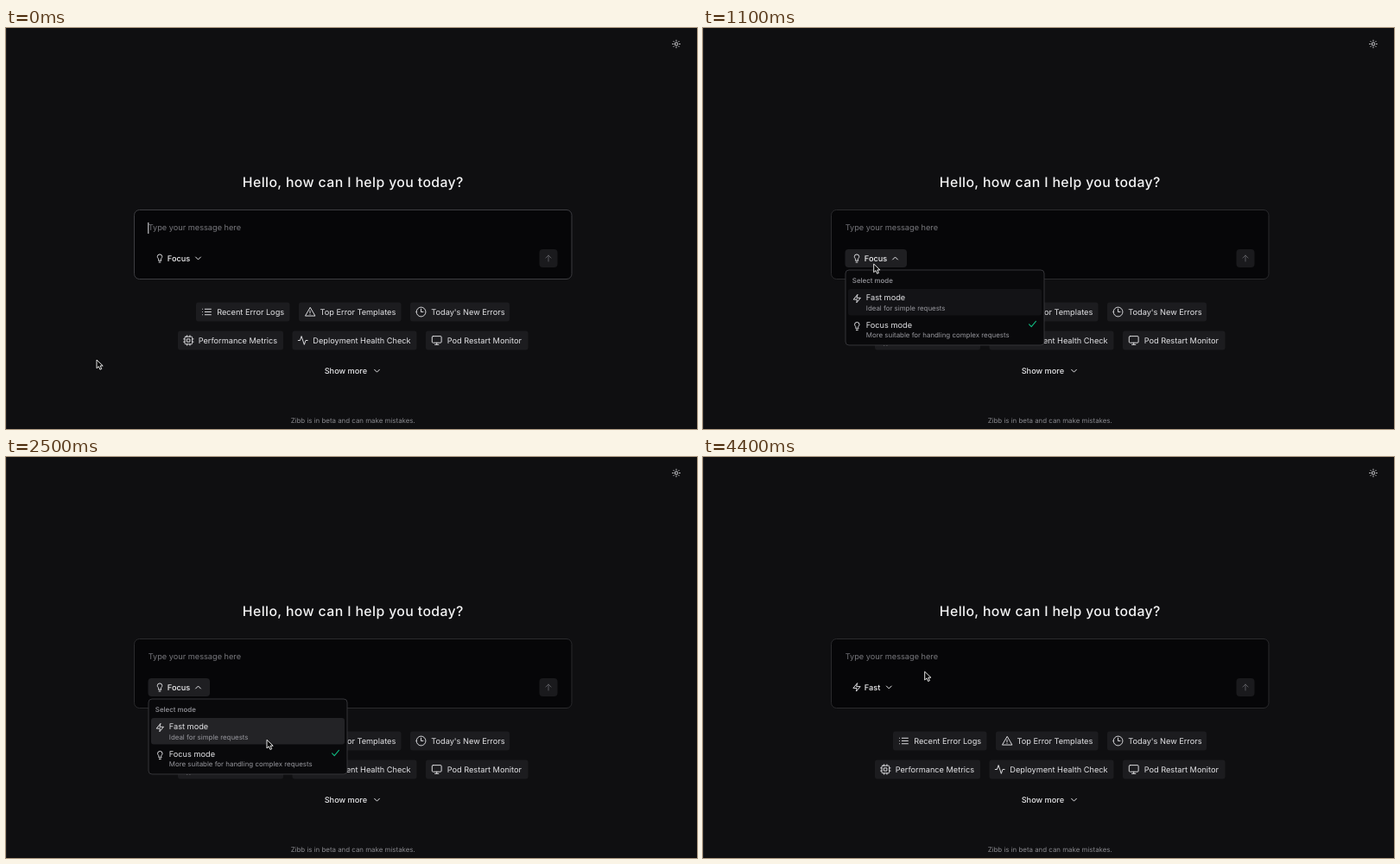
Write an HTML page that moves like this. It is 800 by 464 pixels and loops after 5.5 s.

```html
<!DOCTYPE html>
<html lang="en">
<head>
<meta charset="utf-8">
<title>Assistant mode picker</title>
<style>
  html, body { margin: 0; width: 100%; height: 100%; overflow: hidden; background: #0f0f11; }
  svg { display: block; width: 800px; height: 464px; font-family: Inter, "Open Sans", sans-serif; }
  text { white-space: pre; text-rendering: geometricPrecision; }
  .icon { fill: none; stroke-linecap: round; stroke-linejoin: round; }
</style>
</head>
<body>
<svg id="stage" viewBox="0 0 800 464"></svg>
<script>
const LOOP = 5500, STEP = 100;
const BODY = 9.2, SMALL = 7.9, TITLE = 15.8;

// Icon outlines on a 24 unit grid.
const ICONS = {
  sun: 'M8 12a4 4 0 1 0 8 0a4 4 0 1 0-8 0M12 2v2M12 20v2M4.9 4.9l1.4 1.4M17.7 17.7l1.4 1.4M2 12h2M20 12h2M6.3 17.7l-1.4 1.4M19.1 4.9l-1.4 1.4',
  bulb: 'M15 14c.2-1 .7-1.7 1.5-2.5A5.6 5.6 0 0 0 18 8A6 6 0 0 0 6 8c0 1 .2 2.2 1.5 3.5c.7.7 1.3 1.5 1.5 2.5v4h6zM10 22h4',
  bolt: 'M13 2L3 14h9l-1 8L21 10h-9z',
  list: 'M8 6h13M8 12h13M8 18h13M3 6h.01M3 12h.01M3 18h.01',
  warn: 'M12 3L1.8 20.5h20.4zM12 9.5v5M12 17.5h.01',
  clock: 'M2 12a10 10 0 1 0 20 0a10 10 0 1 0-20 0M12 6v6h4.5',
  chip: 'M6 4h12a2 2 0 0 1 2 2v12a2 2 0 0 1-2 2H6a2 2 0 0 1-2-2V6a2 2 0 0 1 2-2zM9 9h6v6H9zM9 1.5V4M15 1.5V4M9 20v2.5M15 20v2.5M1.5 9H4M1.5 15H4M20 9h2.5M20 15h2.5',
  pulse: 'M22 12h-4l-3 9L9 3l-3 9H2',
  monitor: 'M4 3h16a2 2 0 0 1 2 2v10a2 2 0 0 1-2 2H4a2 2 0 0 1-2-2V5a2 2 0 0 1 2-2zM8 21h8M12 17v4',
  arrowUp: 'M12 20V4M5 11l7-7 7 7',
  check: 'M3 13l6 6L21 5',
  chevron: 'M5 8.5l7 7 7-7'
};

const icon = (name, cx, cy, size, color = '#e4e4e7', width = 0.95) =>
  `<path class="icon" d="${ICONS[name]}" stroke="${color}" stroke-width="${width * 24 / size}"
    transform="translate(${cx} ${cy}) scale(${size / 24}) translate(-12 -12)"/>`;
const text = (s, x, y, size = BODY, color = '#e4e4e7', extra = '') =>
  `<text x="${x}" y="${y}" font-size="${size}" fill="${color}" ${extra}>${s}</text>`;
const rect = (x, y, w, h, r, fill, extra = '') =>
  `<rect x="${x}" y="${y}" width="${w}" height="${h}" rx="${r}" fill="${fill}" ${extra}/>`;
const chip = (x, y, w, name, iconX, label, labelX) =>
  rect(x, y, w, 22, 3, '#1c1c1f') + icon(name, iconX, y + 11, 13) + text(label, labelX, y + 14.3);
const chevron = (id, x, y) =>
  `<g id="${id}" transform="translate(${x} ${y})">${icon('chevron', 0, 0, 10, '#e4e4e7', 1)}</g>`;

const medium = 'font-weight="500"';
const muted = '#97979d';

document.getElementById('stage').innerHTML = `
  ${rect(0, 0, 800, 464, 0, '#0f0f11')}
  ${rect(0, 0, 1, 464, 0, '#1d1d20')}
  ${icon('sun', 776, 18.5, 10.5, '#e4e4e7', 0.9)}
  ${text('Hello, how can I help you today?', 273.8, 184.3, TITLE, '#f4f4f5', medium + ' letter-spacing=".025em"')}

  ${rect(148.5, 210.5, 506.5, 80, 6, '#060608', 'id="composer"')}
  ${text('Type your message here', 164.7, 234, BODY, '#77777c')}
  ${rect(164.3, 225, 1, 13, 0, '#e4e4e7', 'id="caret"')}
  ${rect(164.5, 256, 71.5, 21, 4, '#1f1f22', 'id="modeHover"')}
  <g id="focusLabel">${icon('bulb', 178, 266.5, 11)}${text('Focus', 186.8, 269.8, BODY, '#f0f0f2', medium)}</g>
  <g id="fastLabel">${icon('bolt', 178, 266.5, 11)}${text('Fast', 186.8, 269.8, BODY, '#f0f0f2', medium)}</g>
  ${chevron('modeChevron', 222.5, 266.5)}
  ${rect(617.5, 256, 21, 21, 4, '#1a1a1d')}
  ${icon('arrowUp', 628, 266.5, 10.5, '#5c5c61')}

  ${chip(220, 317.5, 108.5, 'list', 232.5, 'Recent Error Logs', 244.2)}
  ${chip(339, 317.5, 118.5, 'warn', 352, 'Top Error Templates', 363.6)}
  ${chip(468, 317.5, 115, 'clock', 480.5, "Today's New Errors", 492.3)}
  ${chip(199, 350.5, 122, 'chip', 211.3, 'Performance Metrics', 222.7)}
  ${chip(331.5, 350.5, 144, 'pulse', 343.7, 'Deployment Health Check', 355.3)}
  ${chip(486, 350.5, 118.5, 'monitor', 498.7, 'Pod Restart Monitor', 510.7)}
  ${text('Show more', 368.7, 399.8, BODY, '#e4e4e7', medium)}
  ${chevron('moreChevron', 429.5, 396.7)}
  ${text('Zibb is in beta and can make mistakes.', 401.7, 456.8, SMALL, '#88888d', 'text-anchor="middle"')}

  <g id="menu">
    ${rect(165, 280, 230, 87, 4, '#09090b', 'stroke="#343438"')}
    ${text('Select mode', 172.8, 294.8, SMALL, muted, medium)}
    ${rect(168, 302, 224, 30.5, 3, '#232326', 'id="rowHover"')}
    ${icon('bolt', 178.3, 313.2, 11)}
    ${text('Fast mode', 188.8, 315.3)}
    ${text('Ideal for simple requests', 188.8, 326.6, SMALL, muted)}
    ${icon('bulb', 178.3, 345, 11)}
    ${text('Focus mode', 188.8, 346.8)}
    ${text('More suitable for handling complex requests', 188.8, 358.3, SMALL, muted)}
    <g id="check">${icon('check', 381.5, 342.5, 10.5, '#10b981', 1.1)}</g>
  </g>

  <g id="pointer" stroke-linejoin="round">
    <path id="arrow" d="M0 0V9.7L2.3 7.6L3.9 11.2L5.7 10.4L4.1 6.9H7.2Z" fill="#050505" stroke="#fff" stroke-width=".9"/>
    <path id="hand" d="M-.4.8C-.4-.5 1.3-.5 1.4.8L1.7 4C2.3 3.5 3.1 3.7 3.3 4.3C3.9 3.9 4.7 4.1 4.9 4.8C5.7 4.5 6.4 5 6.4 5.9C6.5 7.8 6 8.5 5.5 9.5V11H.8L.5 9.8C-.3 8.8-1.2 7.5-2 6.5C-2.6 5.5-1.3 4.9-.6 5.6L.1 6.3Z"
      fill="#fff" stroke="#111" stroke-width=".6"/>
  </g>`;

const el = id => document.getElementById(id);
const [composer, caret, modeHover, focusLabel, fastLabel, modeChevron, menu, rowHover, check, pointer, arrow, hand] =
  ['composer', 'caret', 'modeHover', 'focusLabel', 'fastLabel', 'modeChevron', 'menu', 'rowHover', 'check',
    'pointer', 'arrow', 'hand'].map(el);
const show = (node, on) => node.setAttribute('visibility', on ? 'visible' : 'hidden');

// Pointer waypoints: time, x, y.
const PATH = [
  [0, 105, 384], [100, 108, 381], [200, 122, 364], [300, 148, 334], [400, 174, 305], [500, 190, 285],
  [600, 196, 276], [900, 197.7, 273.7], [1000, 197.7, 273], [1400, 197.7, 273],
  [1500, 208, 273.7], [1600, 237, 277], [1700, 263.5, 282.5], [1800, 278, 288], [2000, 293, 298],
  [2200, 300, 314], [2500, 302, 327.3], [3300, 302, 327.3], [3400, 301, 325],
  [3600, 293, 302], [3900, 276, 264], [4400, 256.7, 248.3], [LOOP, 256.7, 248.3]
];

function pointerAt(t) {
  const i = PATH.findIndex(p => p[0] > t);
  const [t0, x0, y0] = PATH[i - 1], [t1, x1, y1] = PATH[i];
  const k = (t - t0) / (t1 - t0);
  return [x0 + (x1 - x0) * k, y0 + (y1 - y0) * k];
}

function openness(t) {
  if (t < 1000 || t >= 3500) return 0;
  return t < 1100 || t >= 3400 ? 0.62 : 1;
}

function render(t) {
  const open = openness(t), fast = t >= 3400;

  composer.setAttribute('stroke', t < 1000 ? '#3d3d41' : '#2a2a2d');
  show(caret, t < 300 || (t >= 800 && t < 1000));
  show(modeHover, t >= 600 && !fast);
  show(focusLabel, !fast);
  show(fastLabel, fast);
  modeChevron.setAttribute('transform',
    `translate(${fast ? 215.3 : 222.5} 266.5) rotate(${open === 1 ? 180 : open ? 138 : 0})`);

  show(menu, open > 0);
  menu.setAttribute('opacity', open);
  menu.setAttribute('transform', `translate(280 323.5) scale(${0.95 + 0.05 * open}) translate(-280 -323.5)`);
  rowHover.setAttribute('opacity', t < 1100 ? 0 : t < 1300 ? 0.4 : 1);
  check.setAttribute('transform', `translate(0 ${fast ? -32 : 0})`);
  check.setAttribute('opacity', open);

  const overButton = t >= 600 && t < 1000;
  show(hand, overButton);
  show(arrow, !overButton);
  pointer.setAttribute('transform', `translate(${pointerAt(t)})`);
}

const start = performance.now();
function tick() {
  const t = (performance.now() - start) % LOOP;
  render(Math.floor(t / STEP) * STEP);
  requestAnimationFrame(tick);
}
render(0);
requestAnimationFrame(tick);
</script>
</body>
</html>
```
